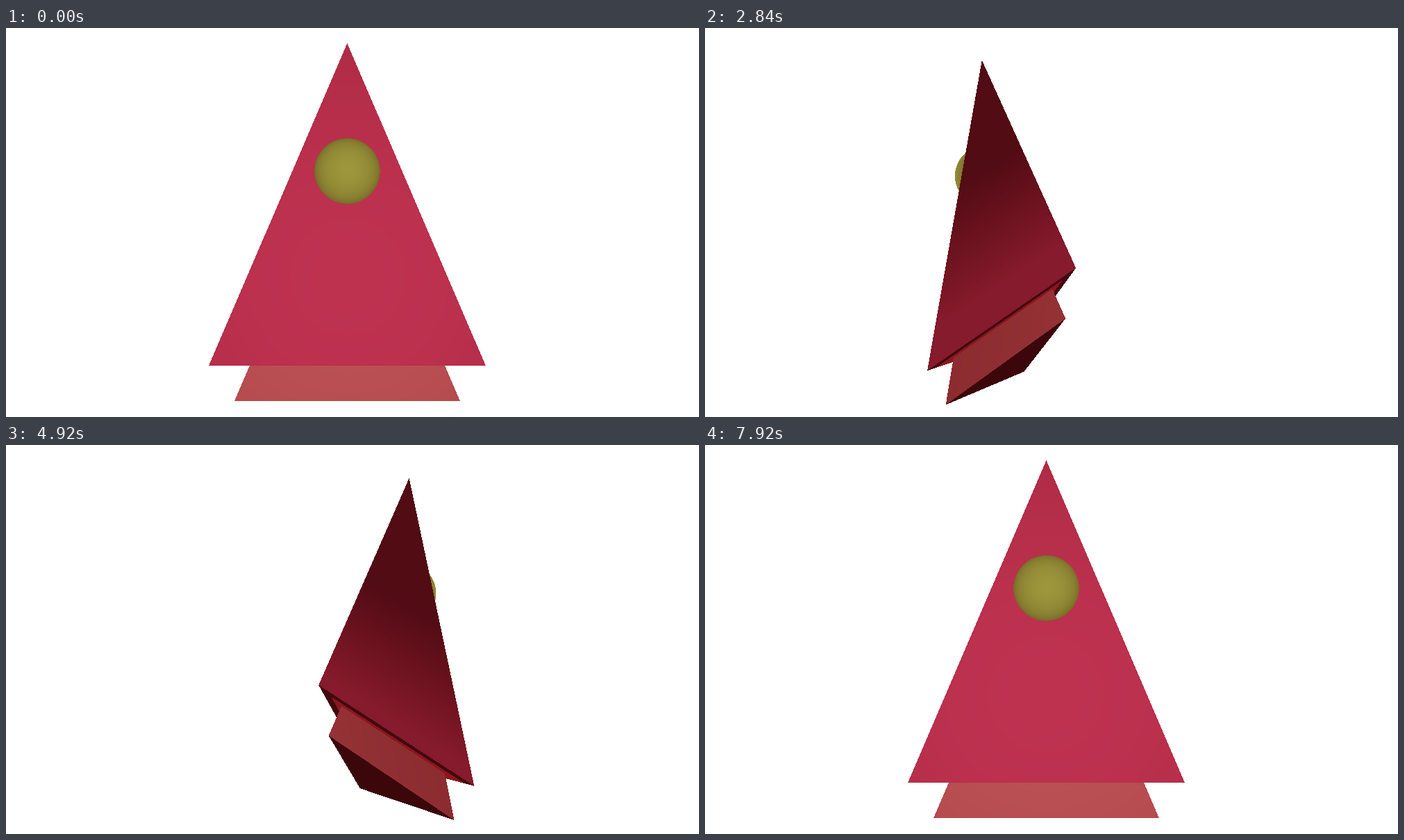
An HTML page with a canvas for the animation above (8360 ms loop, 998 px wide and 561 px high).

```html
<!DOCTYPE html>
<html>
<head>
<meta charset="utf-8">
<style>
html, body { margin: 0; width: 100%; height: 100%; overflow: hidden; background: #fff; }
canvas { display: block; }
</style>
</head>
<body>
<canvas id="stage" width="998" height="561"></canvas>
<script>
const ctx = document.getElementById('stage').getContext('2d');
const LOOP = 8360, TURN = 7960, LEAD = 60, STEP = 40;
const CX = 491.5, CY = 284.5, DIST = 1389;          // projection centre, camera distance
const LIGHT = { y: 70, z: 750 };
const BOX = { x: 270, y: 16, w: 445, h: 545 };
const BALL = { y: -72.5, z: 95, r: 44.2 };
const FRONT = 0, BOTTOM = 3;

const image = ctx.createImageData(BOX.w, BOX.h);
const pixels = image.data;

const clamp = v => Math.max(0, Math.min(1, v));
const smooth = v => { v = clamp(v); return v * v * (3 - 2 * v); };
const sub = (a, b) => a.map((v, i) => v - b[i]);
const dot = (a, b) => a[0] * b[0] + a[1] * b[1] + a[2] * b[2];
const cross = (a, b) => [
  a[1] * b[2] - a[2] * b[1],
  a[2] * b[0] - a[0] * b[2],
  a[0] * b[1] - a[1] * b[0]
];

// Plane through three points, facing away from the point "inside".
function plane(a, b, c, inside) {
  let n = cross(sub(b, a), sub(c, a));
  const len = Math.hypot(...n) * (dot(n, sub(inside, a)) > 0 ? -1 : 1);
  n = n.map(v => v / len);
  return { n, k: dot(n, a) };
}

// Upright front triangle with one more corner behind it.
function pyramid(half, top, base, front, backY, backZ) {
  const tip = [0, top, front], left = [-half, base, front],
        right = [half, base, front], back = [0, backY, backZ];
  const planes = [
    plane(tip, left, right, back),
    plane(tip, left, back, right),
    plane(tip, right, back, left),
    plane(left, right, back, tip)
  ];
  const floor = planes[BOTTOM];
  return { planes, height: floor.k - dot(floor.n, tip) };
}

const upper = pyramid(185.1, -243.6, 187.9, 100, 61, -44.5);
const lower = pyramid(152.1, -117.4, 237.3, 89, 133.6, -29);
const upperFloor = upper.planes[BOTTOM];

const offset = (p, x, y, z) => p.n[0] * x + p.n[1] * y + p.n[2] * z - p.k;

// Entry point of the ray into a convex body; returns distance, sets hitFace.
let hitFace = 0;
function enter(body, ox, oz, dx, dy, dz) {
  let near = -Infinity, far = Infinity, face = 0;
  for (let i = 0; i < 4; i++) {
    const p = body.planes[i], n = p.n;
    const slope = n[0] * dx + n[1] * dy + n[2] * dz;
    const t = (p.k - n[0] * ox - n[2] * oz) / slope;
    if (slope < 0) { if (t > near) { near = t; face = i; } }
    else if (t < far) far = t;
  }
  hitFace = face;
  return near < far ? near : Infinity;
}

function enterBall(ox, oz, dx, dy, dz) {
  const z = oz - BALL.z, y = -BALL.y;
  const a = dx * dx + dy * dy + dz * dz;
  const b = ox * dx + y * dy + z * dz;
  const c = ox * ox + y * y + z * z - BALL.r * BALL.r;
  const disc = b * b - a * c;
  return disc > 0 ? (-b - Math.sqrt(disc)) / a : Infinity;
}

function put(i, r, g, b) {
  pixels[i] = r;
  pixels[i + 1] = g;
  pixels[i + 2] = b;
}

function frontLight(x, y, z, sin, cos) {
  const h = LIGHT.z * cos - z;
  return Math.max(0, h) / Math.hypot(h, x - LIGHT.z * sin, y - LIGHT.y);
}

function paintUpper(i, face, x, y, z, sin, cos, fade) {
  let v;
  if (face === FRONT) {
    v = frontLight(x, y, z, sin, cos);
  } else if (face === BOTTOM) {
    const gap = Math.max(...lower.planes.slice(0, 3).map(p => offset(p, x, y, z)));
    if (gap < 14) return put(i, 74 + 66 * fade, 7 + 15 * fade, 11 + 17 * fade);
    v = 0.17 * fade;
  } else {
    const rise = -offset(upperFloor, x, y, z) / upper.height;
    v = 0.27 * fade + 0.35 * clamp((0.58 - rise + 0.9 * (cos + 0.31)) / 0.45);
  }
  put(i, 41 + 149 * v, 5 + 18 * v + 27 * v * v, 8 + 34 * v + 38 * v * v);
}

function paintLower(i, face, x, y, z, sin, cos, fade) {
  let v;
  if (face === FRONT) {
    v = frontLight(x, y, z, sin, cos);
  } else if (face === BOTTOM) {
    v = 0.12 * fade;
  } else {
    if (fade < 0.3 && offset(upperFloor, x, y, z) < 20) return put(i, 74, 7, 11);
    v = (0.73 - 0.06 * clamp((z + 29) / 118)) * fade;
  }
  const p = Math.pow(v, 1.7);
  put(i, 41 + 147 * v, 5 + 77 * p, 8 + 78 * p);
}

function draw(time) {
  const turn = 2 * Math.PI * smooth((time + LEAD) / TURN);
  const sin = Math.sin(turn), cos = Math.cos(turn);
  const fade = smooth((cos + 0.95) / 0.55);
  const ox = DIST * sin, oz = DIST * cos;
  pixels.fill(255);

  for (let row = 0, i = 0; row < BOX.h; row++) {
    const dy = BOX.y + row + 0.5 - CY;
    for (let col = 0; col < BOX.w; col++, i += 4) {
      const px = BOX.x + col + 0.5 - CX;
      const dx = px * cos - ox, dz = -px * sin - oz;
      const tLow = enter(lower, ox, oz, dx, dy, dz), lowFace = hitFace;
      const tUp = enter(upper, ox, oz, dx, dy, dz), upFace = hitFace;
      const tBall = enterBall(ox, oz, dx, dy, dz);
      const t = Math.min(tLow, tUp, tBall);
      if (t === Infinity) continue;

      const x = ox + dx * t, y = dy * t, z = oz + dz * t;
      if (t === tBall) {
        const v = clamp((z - BALL.z) / BALL.r);
        put(i, 112 + 44 * v, 97 + 53 * v, 35 + 25 * v);
      } else if (t === tUp) {
        paintUpper(i, upFace, x, y, z, sin, cos, fade);
      } else {
        paintLower(i, lowFace, x, y, z, sin, cos, fade);
      }
    }
  }
  ctx.putImageData(image, BOX.x, BOX.y);
}

let shown = -1;
function tick() {
  const time = Math.min(7920, Math.floor(performance.now() % LOOP / STEP) * STEP);
  if (time !== shown) draw(shown = time);
  requestAnimationFrame(tick);
}
tick();
</script>
</body>
</html>
```
